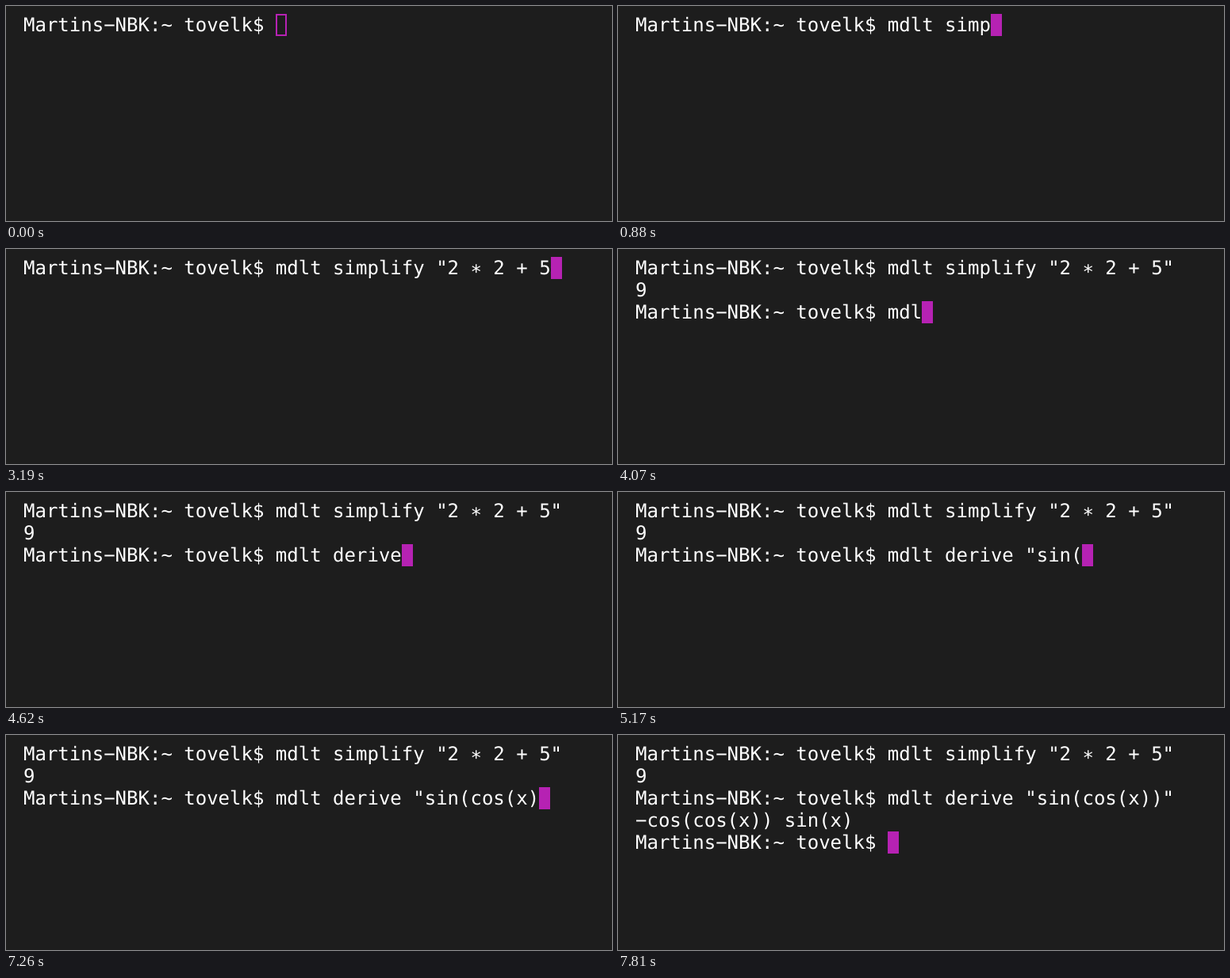
An HTML page for the animation above (8 s loop, 764 by 272 pixels).

```html
<!DOCTYPE html>
<html lang="en">
<head>
<meta charset="utf-8">
<title>Terminal session</title>
<style>
  html, body { margin: 0; width: 100%; height: 100%; overflow: hidden; background: #1d1d1d; }
  svg { display: block; }
  text {
    font: 24px "DejaVu Sans Mono", monospace;
    fill: #fff;
    white-space: pre;
    text-rendering: geometricPrecision;
  }
  #cursor { fill: #b622b3; stroke: #b622b3; stroke-width: 2; }
  #cursor.hollow { fill: none; }
</style>
</head>
<body>
<svg id="stage" width="764" height="272" viewBox="0 0 764 272">
  <rect id="cursor" width="12" height="26"/>
</svg>
<script>
const LOOP = 8000, TICK = 110;
const LEFT = 22, TOP = 10, CELL = 14.448, LINE = 28, BASELINE = 22, ROWS = 5;
const PROMPT = 'Martins−NBK:~ tovelk$ ';

const steps = [];
let written = '';

// Put the whole text on screen at one tick
function show(tick, text) {
  written += text;
  steps.push({ time: tick * TICK, screen: written.replace(/.\x08/g, '') });
}

// Type the text evenly, three characters in two ticks
function type(tick, text) {
  const count = Math.ceil(text.length * 2 / 3);
  const reach = k => Math.round(text.length * k / count);
  for (let k = 0; k < count; k++) show(tick + k, text.slice(reach(k), reach(k + 1)));
}

show(0, PROMPT);
type(3, 'mdlt simp');
type(10, 'lify "');
type(16, '2');
type(17, ' *');
type(20, ' 2');
type(23, ' ');
show(27, '+ ');
type(29, '5');
type(31, '"\n');
show(33, '9\n');
show(34, PROMPT);
type(36, 'mdlt derive ');
type(44, '"sin(');
type(51, 'cos(');
type(57, 'x)');
type(62, '"');
type(66, '\b)');
show(70, '"\n');
show(71, '−cos(cos(x)) sin(x)\n' + PROMPT);

const stage = document.getElementById('stage');
const cursor = document.getElementById('cursor');
const rows = Array.from({ length: ROWS }, () =>
  stage.appendChild(document.createElementNS('http://www.w3.org/2000/svg', 'text')));

const columnX = column => LEFT + column * CELL;
const rowY = row => TOP + row * LINE;

function drawRow(node, line, row) {
  const chars = [...line];
  const base = rowY(row) + BASELINE;
  node.textContent = line;
  node.setAttribute('x', chars.map((c, i) => columnX(i).toFixed(2)).join(' '));
  // The asterisk sits at the height of the operators
  node.setAttribute('y', chars.map(c => c === '*' ? base + 5 : base).join(' '));
}

function drawScreen(screen) {
  const lines = screen.split('\n');
  const last = lines.length - 1;
  rows.forEach((node, row) => drawRow(node, lines[row] || '', row));
  cursor.setAttribute('x', Math.round(columnX(lines[last].length)) + 1);
  cursor.setAttribute('y', rowY(last) + 1);
}

let shown = null;
function render(time) {
  const { screen } = steps.filter(step => step.time <= time).pop();
  if (screen !== shown) drawScreen(shown = screen);
  cursor.setAttribute('class', time < TICK ? 'hollow' : '');
}

const begin = performance.now();
function frame() {
  render((performance.now() - begin) % LOOP);
  requestAnimationFrame(frame);
}
frame();
</script>
</body>
</html>
```
